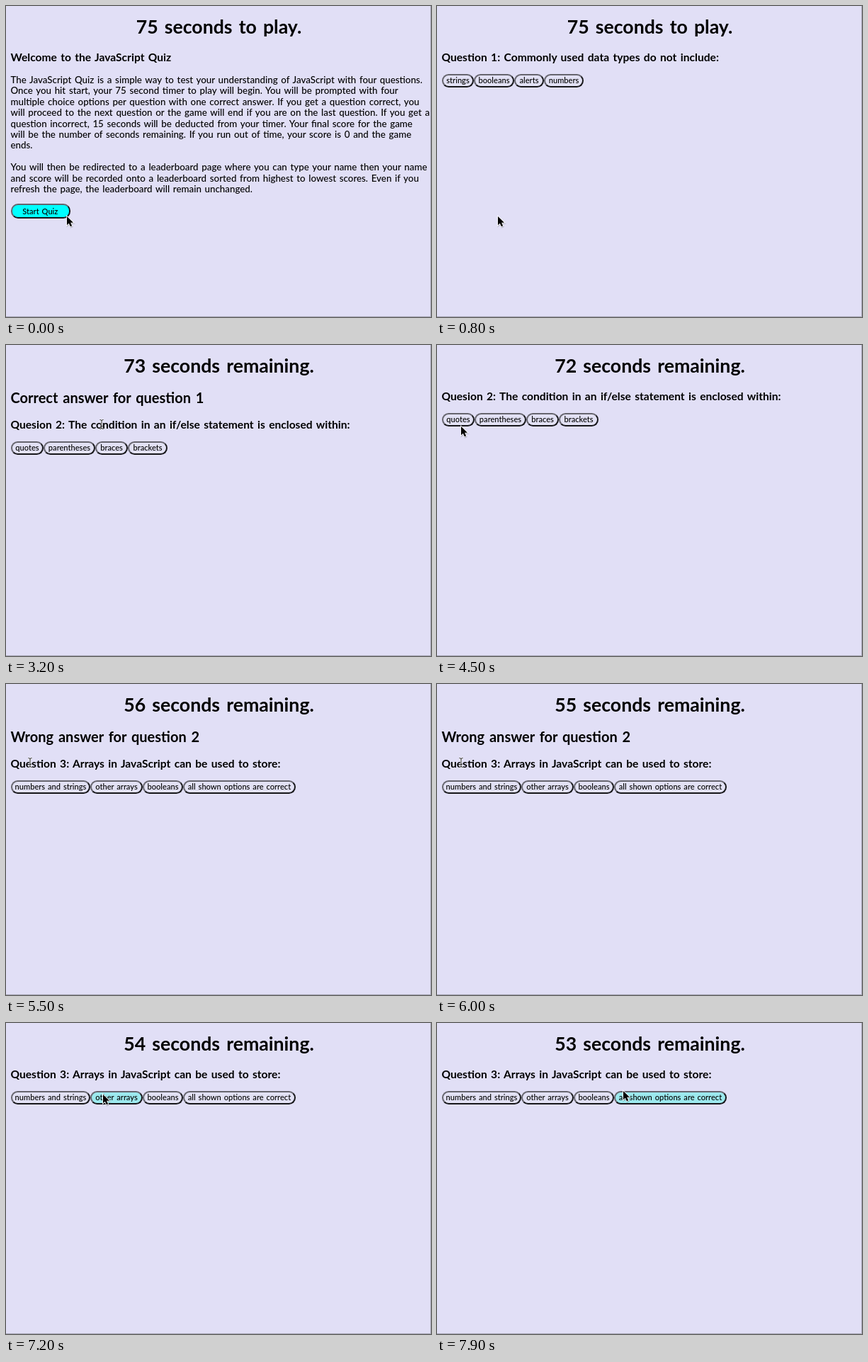
Animation, 600 px wide and 439 px high, one loop 8 s. Source, as an HTML page:

```html
<!DOCTYPE html>
<html lang="en">
<head>
<meta charset="utf-8">
<title>JavaScript Quiz</title>
<style>
html, body { margin: 0; width: 100%; height: 100%; overflow: hidden; background: #e1dff6; }
#stage { position: relative; width: 600px; height: 439px; overflow: hidden; background: #e1dff6; }
#stage::after { content: ""; position: absolute; inset: 0; border: solid #a9a8b8; border-width: 0 1px 1px 0; }
svg { position: absolute; inset: 0; }
text { font-family: Lato, "Open Sans", sans-serif; font-size: 13.33px; font-weight: 500; word-spacing: .1em; }
.h1, .h2, .h3 { font-weight: 700; }
.h1 { font-size: 26.67px; text-anchor: middle; }
.h2 { font-size: 20px; }
.h3 { font-size: 15.6px; }
.label { font-size: 11.1px; text-anchor: middle; }
.box { position: absolute; box-sizing: border-box; border: 2px solid; border-color: #66656e #17171a #17171a #66656e; border-radius: 10px; background: #e2e1f4; }
.box.hot { background: #9ce9ee; }
.box.start { background: #0ff; }
</style>
</head>
<body>
<div id="stage"></div>
<script type="module">
const LOOP = 8000, STEP = 100;
const NS = "http://www.w3.org/2000/svg";
const stage = document.getElementById("stage");

const intro = [
  "The JavaScript Quiz is a simple way to test your understanding of JavaScript with four questions.",
  "Once you hit start, your 75 second timer to play will begin. You will be prompted with four",
  "multiple choice options per question with one correct answer. If you get a question correct, you",
  "will proceed to the next question or the game will end if you are on the last question. If you get a",
  "question incorrect, 15 seconds will be deducted from your timer. Your final score for the game",
  "will be the number of seconds remaining. If you run out of time, your score is 0 and the game",
  "ends.",
  "",
  "You will then be redirected to a leaderboard page where you can type your name then your name",
  "and score will be recorded onto a leaderboard sorted from highest to lowest scores. Even if you",
  "refresh the page, the leaderboard will remain unchanged."
];

const questions = [
  { text: "Question 1: Commonly used data types do not include:",
    options: ["strings", "booleans", "alerts", "numbers"], edges: [7, 52, 109, 151, 207] },
  { text: "Quesion 2: The condition in an if/else statement is enclosed within:",
    options: ["quotes", "parentheses", "braces", "brackets"], edges: [7, 53, 126, 172, 228] },
  { text: "Question 3: Arrays in JavaScript can be used to store:",
    options: ["numbers and strings", "other arrays", "booleans", "all shown options are correct"], edges: [7, 119, 193, 250, 409] }
];

// start time, question index (-1 = welcome page), feedback line
const scenes = [
  [0, -1, ""],
  [800, 0, ""],
  [2700, 1, "Correct answer for question 1"],
  [3800, 1, ""],
  [5500, 2, "Wrong answer for question 2"],
  [6600, 2, ""]
];

const clock = [
  [0, "75 seconds to play."],
  ...[[1800, 74], [2800, 73], [3800, 72], [4800, 71], [5500, 56], [5800, 55], [6800, 54], [7800, 53]]
    .map(([t, n]) => [t, n + " seconds remaining."])
];

const path = [
  [0, 86, 297], [1700, 86, 297], [2400, 134, 115], [2600, 135, 112], [4200, 135, 112],
  [4500, 34, 115], [4700, 34, 116], [5000, 34, 111], [6600, 34, 111],
  [7200, 137, 101], [7400, 143, 102], [7900, 263, 96]
];

const svgEl = (parent, tag, attrs) => {
  const el = document.createElementNS(NS, tag);
  for (const k in attrs) el.setAttribute(k, attrs[k]);
  return parent.appendChild(el);
};
const layer = parent => svgEl(parent, "svg", { width: 600, height: 439 });
const write = (parent, cls, x, y, str) => {
  const el = svgEl(parent, "text", { class: cls, x, y });
  el.textContent = str;
  return el;
};
const addBox = (parent, cls, x, y, w, h) => {
  const el = document.createElement("div");
  el.className = "box " + cls;
  el.style.cssText = `left:${x}px;top:${y}px;width:${w}px;height:${h}px`;
  return parent.appendChild(el);
};

function buildScene([start, index, feedback]) {
  const root = stage.appendChild(document.createElement("div"));
  const boxes = [];
  const drop = feedback ? 40 : 0;
  if (index < 0) {
    addBox(root, "start", 6.5, 279, 84, 21);
    const svg = layer(root);
    write(svg, "h3", 6.5, 78, "Welcome to the JavaScript Quiz");
    intro.forEach((line, i) => write(svg, "", 6.5, 109 + i * 15.4, line));
    write(svg, "label", 48.3, 293.5, "Start Quiz");
  } else {
    const { text, options, edges } = questions[index];
    const y = 96 + drop;
    options.forEach((_, i) => {
      const x = edges[i], w = edges[i + 1] - x;
      boxes.push({ x, y, w, el: addBox(root, "", x - 0.5, y, w + 0.5, 18.5) });
    });
    const svg = layer(root);
    if (feedback) write(svg, "h2", 6.5, 82, feedback);
    write(svg, "h3", 6.5, 78 + drop, text);
    options.forEach((o, i) => write(svg, "label", (edges[i] + edges[i + 1]) / 2, y + 13, o));
  }
  return { start, root, boxes, feedback };
}

const pages = scenes.map(buildScene);
const overlay = layer(stage);
const heading = write(overlay, "h1", 300.5, 39, "");

const arrow = svgEl(overlay, "g", {});
const shape = "M0 0V12.3L2.8 9.7L4.9 14.2L7.1 13.2L5.1 8.8H8.9Z";
svgEl(arrow, "path", { d: shape, transform: "translate(.5 1.2)", fill: "#0003", stroke: "#0002", "stroke-width": 2 });
svgEl(arrow, "path", { d: shape, fill: "#000", stroke: "#fff", "stroke-width": 1.6, "paint-order": "stroke" });

const beam = svgEl(overlay, "g", {});
const bar = "M-2.5 -6.5Q0 -6.5 0 -5Q0 -6.5 2.5 -6.5M0 -5V5M-2.5 6.5Q0 6.5 0 5Q0 6.5 2.5 6.5M-1.5 2.5H1.5";
svgEl(beam, "path", { d: bar, fill: "none", stroke: "#fff", "stroke-width": 2.2 });
svgEl(beam, "path", { d: bar, fill: "none", stroke: "#222", "stroke-width": 1 });

const latest = (list, t, key) => list.filter(e => e[key] <= t).pop();

function pointer(t) {
  const i = path.findIndex(p => p[0] > t);
  if (i < 0) return path[path.length - 1].slice(1);
  const [t0, x0, y0] = path[i - 1], [t1, x1, y1] = path[i];
  const u = (t - t0) / (t1 - t0), k = u * u * (3 - 2 * u);
  return [x0 + (x1 - x0) * k, y0 + (y1 - y0) * k];
}

function draw(t) {
  const page = latest(pages, t, "start");
  pages.forEach(p => { p.root.style.display = p === page ? "" : "none"; });
  heading.textContent = latest(clock, t, 0)[1];
  const [x, y] = pointer(t);
  for (const b of page.boxes) {
    b.el.classList.toggle("hot", x >= b.x && x < b.x + b.w && y >= b.y && y < b.y + 18);
  }
  const move = `translate(${x.toFixed(1)} ${y.toFixed(1)})`;
  arrow.setAttribute("transform", move);
  beam.setAttribute("transform", move);
  arrow.style.display = page.feedback ? "none" : "";
  beam.style.display = page.feedback ? "" : "none";
}

const begin = performance.now();
function tick() {
  const t = (performance.now() - begin) % LOOP;
  draw(Math.floor(t / STEP) * STEP);
  requestAnimationFrame(tick);
}
tick();
</script>
</body>
</html>
```
